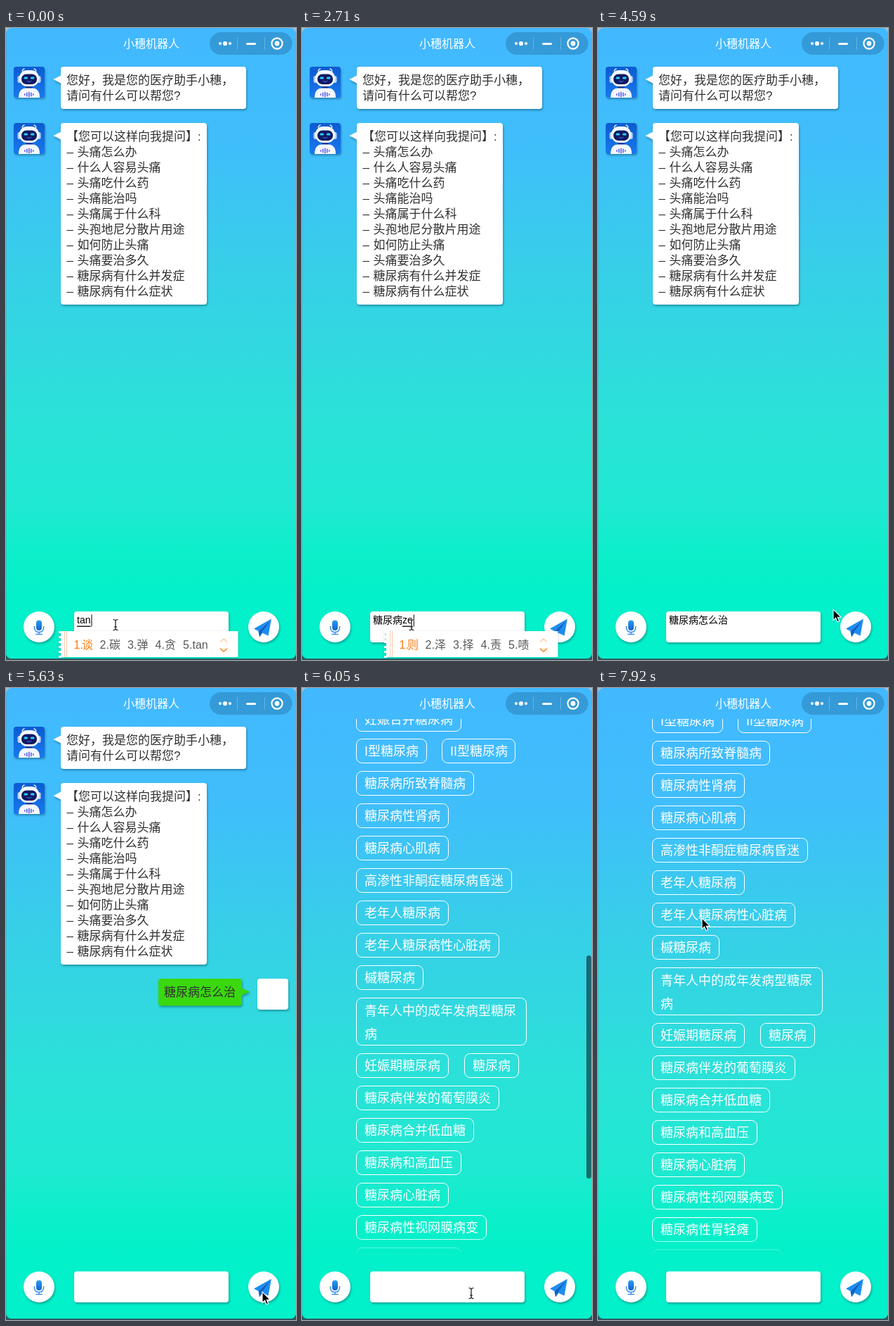
Recreate the animation shown at these times as an HTML page. Size 413x898 px, loop 8000 ms.

```html
<!DOCTYPE html>
<html lang="zh-CN">
<head>
<meta charset="utf-8">
<title>小穗机器人</title>
<style>
html, body { margin: 0; width: 100%; height: 100%; overflow: hidden; background: #2c5a63; }
svg { display: block; width: 413px; height: 898px; }
text { font-family: "Liberation Sans", "Noto Sans CJK SC", "Noto Sans CJK", sans-serif; white-space: pre; }
.shade { filter: drop-shadow(1px 2px 1.5px rgba(0, 40, 60, .38)); }
.say { font-size: 17px; fill: #303030; }
.tag { font-size: 18px; fill: #fff; }
</style>
</head>
<body>
<svg id="stage" viewBox="0 0 413 898" xmlns="http://www.w3.org/2000/svg"></svg>
<script>
const LOOP = 8000, TICK = 208.3;
const $ = id => document.getElementById(id);
const rect = (x, y, w, h, r, fill, more = '') =>
  `<rect x="${x}" y="${y}" width="${w}" height="${h}" rx="${r}" fill="${fill}" ${more}/>`;
const text = (x, y, str, more = '') => `<text x="${x}" y="${y}" ${more}>${str}</text>`;
const circle = (x, y, r, fill, more = '') => `<circle cx="${x}" cy="${y}" r="${r}" fill="${fill}" ${more}/>`;
const path = (d, fill, more = '') => `<path d="${d}" fill="${fill}" ${more}/>`;
const stroke = (color, w) => `stroke="${color}" stroke-width="${w}" stroke-linecap="round" stroke-linejoin="round"`;

// ---- chat content ----
const robot = y => `<g transform="translate(11 ${y})" class="shade">
  ${rect(0, 0, 44, 44, 4, 'url(#blue)')}
  ${path('M13 9Q11 4 15 3M31 9Q33 4 29 3', 'none', stroke('#e9f4ff', 1.4))}
  ${rect(5.5, 13, 5, 10, 2.5, '#b9d6f7')}${rect(33.5, 13, 5, 10, 2.5, '#b9d6f7')}
  ${rect(8, 5, 28, 23, 11, '#f6faff')}
  ${rect(11, 10.5, 22, 14.5, 7, '#101a63')}
  ${rect(14.5, 14.5, 5.5, 3, 1.5, '#28d3ff')}${rect(24, 14.5, 5.5, 3, 1.5, '#28d3ff')}
  ${path('M19 20.5Q22 22.5 25 20.5', 'none', stroke('#4b6ae0', 1))}
  ${rect(17, 28, 10, 3, 1, '#0d3a9c')}
  ${path('M7 44Q7 31 17 30.5H27Q37 31 37 44Z', '#f3f8ff')}
  ${[3, 6, 8, 6, 3].map((h, i) => rect(15 + i * 3, 39.5 - h / 2, 1.6, h, .8, i % 2 ? '#3f6cf0' : '#7a52e0')).join('')}
</g>`;

const bubble = (y, w, h) =>
  `<g class="shade">${rect(78, y, w, h, 4, '#fff')}${path(`M67.5 ${y + 18}L79 ${y + 12}V${y + 24}Z`, '#fff')}</g>`;

const hints = ['头痛怎么办', '什么人容易头痛', '头痛吃什么药', '头痛能治吗', '头痛属于什么科', '头孢地尼分散片用途',
  '如何防止头痛', '头痛要治多久', '糖尿病有什么并发症', '糖尿病有什么症状'];

const greeting = robot(55) + bubble(55, 264, 60) +
  text(86, 80, '您好，我是您的医疗助手小穗，', 'class="say"') +
  text(86, 102, '请问有什么可以帮您?', 'class="say"') +
  robot(135) + bubble(135, 208, 258) +
  text(86, 160, '【您可以这样向我提问】:', 'class="say"') +
  hints.map((h, i) => text(86.5, 182 + i * 22, '–', 'class="say"') +
    text(101.5, 182 + i * 22, h, 'class="say"')).join('');

const question = `<g class="shade">${rect(217, 413, 119, 38.5, 4, '#3ad80f')}
  ${path('M335 426L347 431.5L335 437Z', '#3ad80f')}${rect(358, 413, 44, 44, 4, '#fff')}</g>` +
  text(225, 438, '糖尿病怎么治', 'class="say"');

const box = (x, y, w, h = 34) => rect(x + .5, y, w - 1, h, 8, 'none', 'stroke="#fff"');
const tag = (x, cy, str, w = str.length * 18 + 24) =>
  box(x, cy - 17, w) + text(x + 12, cy + 6.5, str, 'class="tag"');
const column = (cy, list) => list.map((s, i) => tag(77, cy + i * 46, s)).join('');

const REST = 796;   // scroll offset at which the tag rows below are laid out
const reply = column(44.5, ['妊娠合并糖尿病']) +
  tag(77, 89.5, 'I型糖尿病', 101) + tag(199, 89.5, 'II型糖尿病', 105) +
  column(135.5, ['糖尿病所致脊髓病', '糖尿病性肾病', '糖尿病心肌病', '高渗性非酮症糖尿病昏迷',
    '老年人糖尿病', '老年人糖尿病性心脏病', '槭糖尿病']) +
  box(77, 440.5, 243, 67) +
  text(89, 464.5, '青年人中的成年发病型糖尿', 'class="tag"') + text(89, 497.5, '病', 'class="tag"') +
  tag(231, 536.5, '糖尿病') +
  column(536.5, ['妊娠期糖尿病', '糖尿病伴发的葡萄膜炎', '糖尿病合并低血糖', '糖尿病和高血压',
    '糖尿病心脏病', '糖尿病性视网膜病变', '糖尿病性胃轻瘫']) +
  box(77, 841, 186);

// ---- header and footer ----
const header = text(207, 28, '小穗机器人', 'font-size="16" fill="#fff" text-anchor="middle"') +
  rect(290, 6, 117.5, 32, 16, 'rgba(20,70,110,.27)') +
  circle(305, 22, 2.1, '#fff') + circle(312, 22, 3.1, '#fff') + circle(319, 22, 2.1, '#fff') +
  path('M329.5 13V31M368.5 13V31', 'none', 'stroke="#fff" stroke-opacity=".25"') +
  path('M343.5 22.5H354.5', 'none', stroke('#fff', 3)) +
  circle(386, 22, 7.6, 'none', stroke('#fff', 2.2)) + circle(386, 22, 3.4, '#fff');

const footer = rect(0, 776, 413, 122, 0, 'url(#fade)') +
  `<g class="shade">${circle(47, 851, 22, '#fff')}${circle(367, 851, 22, '#fff')}${rect(97, 829, 220, 44, 4, '#fff')}</g>` +
  rect(43, 841.5, 8, 14.5, 4, 'url(#mic)') +
  path('M40.3 850.5Q40.3 858.5 47 858.5T53.7 850.5M47 858.5V861.3M42.8 861.5H51.2', 'none', stroke('#3d8fe6', 1.5)) +
  path('M378 839.5L353 853.5L359.5 857Z', '#1c8df0') +
  path('M378 839.5L359.5 857L361 865.5L365 859.8Z', '#0e62c4') +
  path('M378 839.5L364 859L373.5 863.5Z', '#1c8df0');

$('stage').innerHTML = `<defs>
  <linearGradient id="sky" x2="0" y2="1">${[[0, '#42b8ff'], [.2, '#3fbffa'], [.38, '#37cfe8'], [.5, '#31d8e0'],
    [.62, '#2ae2d8'], [.76, '#1fe9d1'], [.85, '#08f0ca'], [1, '#03efc9']]
    .map(([o, c]) => `<stop offset="${o}" stop-color="${c}"/>`).join('')}</linearGradient>
  <linearGradient id="fade" x2="0" y2="1"><stop stop-color="#02f0ca" stop-opacity="0"/>
    <stop offset=".25" stop-color="#02f0ca"/><stop offset="1" stop-color="#02f0ca"/></linearGradient>
  <linearGradient id="blue" x2="0" y2="1"><stop stop-color="#0b5bd0"/><stop offset="1" stop-color="#1a78ee"/></linearGradient>
  <linearGradient id="mic" x2="0" y2="1"><stop stop-color="#2a9cf4"/><stop offset="1" stop-color="#1263c8"/></linearGradient>
  <linearGradient id="edge" x2="0" y2="1"><stop stop-color="#a9c3d0"/><stop offset="1" stop-color="#2c5a63"/></linearGradient>
  <clipPath id="view"><rect y="44" width="413" height="762"/></clipPath>
  <clipPath id="window"><rect width="413" height="896" rx="8"/></clipPath>
</defs>
${rect(0, 0, 413, 898, 0, 'url(#edge)')}
<g clip-path="url(#window)">
  ${rect(0, 0, 413, 898, 0, 'url(#sky)')}
  <g clip-path="url(#view)"><g id="scroll">${greeting}<g id="question">${question}</g>
    <g id="reply" transform="translate(0 ${REST})">${reply}</g></g></g>
  ${footer}${header}
  ${rect(405, 0, 7, 317, 3.5, 'rgba(10,40,50,.62)', 'id="thumb"')}
  ${rect(0, 0, 1, 898, 0, 'rgba(120,150,170,.35)')}
</g>
<g id="input"></g><g id="bar"></g><g id="pointer">
  <g id="arrow">${path('M0 0V15.5L3.6 12.2L6 17.8L8.6 16.7L6.2 11.2H11Z', '#000', 'stroke="#fff" stroke-width="1.1"')}</g>
  <g id="beam">${['#fff" stroke-opacity=".7" stroke-width="2.6', '#111" stroke-width="1.2'].map(s =>
    path('M-3.5 -7.5Q0 -7.5 0 -5Q0 -7.5 3.5 -7.5M0 -5.5V5.5M-3.5 7.5Q0 7.5 0 5Q0 7.5 3.5 7.5M-2 3H2', 'none', `stroke="${s}"`)).join('')}</g>
</g>`;

// ---- typing: [tick, committed text, pinyin, candidates] ----
const typing = [
  [0, '', 'tan', '谈 碳 弹 贪 tan'],
  [1, '', 'tang', '糖 堂 汤 唐 躺'],
  [2, '', 'tangni', '糖腻 唐尼 汤尼 糖你 唐妮'],
  [3, '', 'tangniao', '糖尿 糖 堂 汤 唐'],
  [4, '', 'tangniaobing', '糖尿病 糖尿 糖 堂 汤'],
  [6, '糖尿病', '', ''],
  [9, '糖尿病', 'z', '在 怎么 这 中 这个'],
  [10, '糖尿病', 'zh', '这 中 只 这个 知道'],
  [12, '糖尿病', 'z', '在 怎么 这 中 这个'],
  [13, '糖尿病', 'ze', '则 泽 择 责 啧'],
  [15, '糖尿病', 'zen', '怎 怎么 怎样 谮 则'],
  [16, '糖尿病', 'zenme', '怎么 怎么办 怎 谮 则'],
  [18, '糖尿病', 'zenmezhi', '怎么治 怎么 怎 谮 则'],
  [20, '糖尿病怎么治', '', ''],
  [26, '', '', '']
];

function drawInput(k, [, done, pinyin, words]) {
  const start = 101 + done.length * 14;
  $('input').innerHTML = text(101, 846, done + `<tspan id="pinyin">${pinyin}</tspan>`, 'font-size="14" fill="#000"');
  const len = pinyin ? $('pinyin').getComputedTextLength() : 0;
  if (pinyin) $('input').innerHTML += rect(start, 849.5, len, 1.4, 0, '#111');
  if (k < 21) $('input').innerHTML += rect(start + len + 1, 833.5, 1, 17, 0, '#000');
  $('bar').innerHTML = words ? candidates(start - 26, words.split(' ')) : '';
}

function candidates(left, words) {
  let x = left + 21.5, out = '';
  words.forEach((w, i) => {
    const wide = w === 'tan' ? 24 : w.length * 16;
    out += `<g font-size="16" fill="${i ? '#585858' : '#ff7a0a'}">` +
      text(x, 882, i + 1 + '.') + text(x + (i ? 13.5 : 11.5), 882, w) + '</g>';
    x += wide + (i ? 23.5 : 21);
  });
  const right = x + 31, mid = right - 20.5;
  const teeth = Array.from({ length: 6 }, (_, i) => rect(left, 857 + i * 7, 4, 3, 0, '#fff')).join('');
  return `<g style="filter:drop-shadow(0 1px 1.5px rgba(0,60,60,.3))">${rect(left + 3, 857, right - left - 3, 37, 0, '#fff')}${teeth}</g>` +
    path(`M${left + 8.5} 857V894M${left + 11.5} 857V894`, 'none', 'stroke="#ffc9b0"') + out +
    path(`M${mid - 4.5} 872L${mid} 868L${mid + 4.5} 872`, 'none', stroke('#ffc59a', 1.3)) +
    path(`M${mid - 4.5} 882L${mid} 886L${mid + 4.5} 882`, 'none', stroke('#ff7a0a', 1.5));
}

// ---- motion ----
const track = [[0, 156, 848], [20, 156, 848], [21, 262, 812], [22, 335, 826], [25, 365, 858], [27, 365, 858],
  [29, 241, 860], [31, 205, 790], [32, 205, 790], [35, 165, 450], [38, 148, 327]];
const clamp = v => Math.max(0, Math.min(1, v));
const span = (k, a, b) => clamp((k - a) / (b - a));
const ease = v => v * v * (3 - 2 * v);

function pointAt(k) {
  const i = track.findIndex(p => p[0] > k);
  if (i < 0) return track[track.length - 1].slice(1);
  const [a, b] = [track[i - 1], track[i]], u = span(k, a[0], b[0]);
  return [a[1] + (b[1] - a[1]) * u, a[2] + (b[2] - a[2]) * u];
}

const show = (id, on) => $(id).setAttribute('visibility', on ? 'visible' : 'hidden');
const move = (id, x, y) => $(id).setAttribute('transform', `translate(${x} ${y})`);

let last = -1;
function render(ms) {
  const k = Math.floor(ms % LOOP / TICK);
  if (k === last) return;
  last = k;
  drawInput(k, typing.filter(s => s[0] <= k).pop());

  const answered = k >= 28;
  const offset = answered ? REST - 16 + 16 * span(k, 28, 29) + 43 * ease(span(k, 32, 35)) : 0;
  move('scroll', 0, -offset);
  show('question', k >= 26);
  show('reply', answered);
  show('thumb', answered);
  $('thumb').setAttribute('y', 380 + (offset - REST) * .42);
  $('thumb').setAttribute('opacity', 1 - span(k, 34, 37));

  const [x, y] = pointAt(k), inField = x > 97 && x < 317 && y > 829 && y < 873;
  move('pointer', x, y);
  show('beam', inField);
  show('arrow', !inField);
}

const begin = performance.now();
function loop() {
  render(performance.now() - begin);
  requestAnimationFrame(loop);
}
render(0);
requestAnimationFrame(loop);
</script>
</body>
</html>
```
